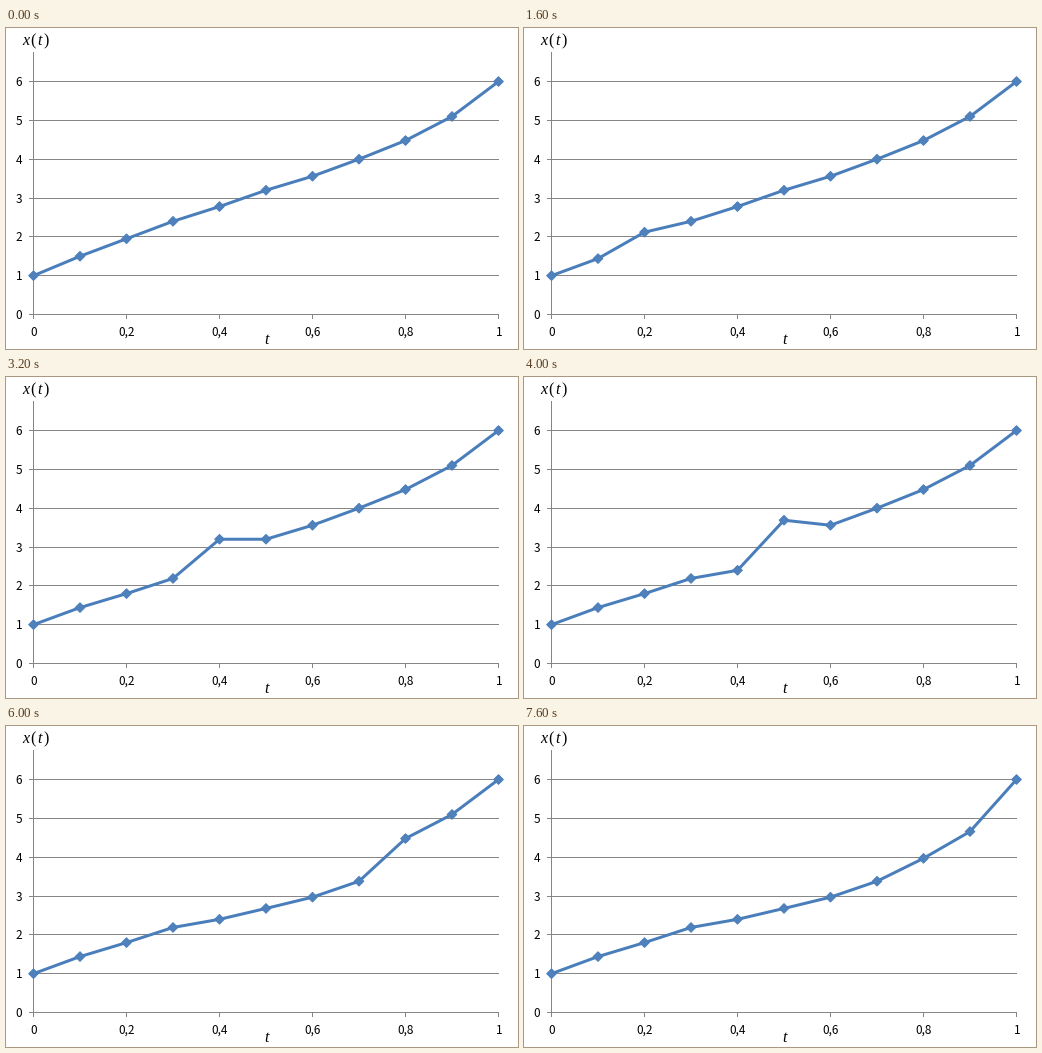
Recreate the animation shown at these times as a matplotlib script. Size 512 by 321 pixels, loop 8 s.

```python
import matplotlib.pyplot as plt
from matplotlib.animation import FuncAnimation
from matplotlib.collections import PolyCollection

W, H, DPI = 512, 321, 64
PX = 72 / DPI  # points per pixel
GREY, BLUE, FILL = "#868686", "#4a7ebb", "#4f81bd"
X0, Y0, DX, DY = 27.5, 286.5, 46.5, 38.83
HALF = 4.8  # half diagonal of a marker

START = [1, 1.5, 1.95, 2.4, 2.78, 3.2, 3.56, 4, 4.48, 5.1, 6]
RAISED = [1, 1.67, 2.12, 2.58, 3.2, 3.69, 4.17, 4.6, 5, 5.54, 6]
FINAL = [1, 1.44, 1.8, 2.19, 2.4, 2.68, 2.97, 3.38, 3.97, 4.66, 6]

fig = plt.figure(figsize=(W / DPI, H / DPI), dpi=DPI, facecolor="white")
ax = fig.add_axes([0, 0, 1, 1])
ax.set_xlim(0, W)
ax.set_ylim(H, 0)
ax.axis("off")


def px_y(value):
    return Y0 - DY * value


def rule(x1, y1, x2, y2):
    # Pixel centres are given exactly, so automatic snapping stays off.
    ax.plot([x1, x2], [y1, y2], color=GREY, lw=PX, snap=False,
            solid_capstyle="butt", zorder=1)


def label(x, y, text, ha):
    ax.text(x, y, text, ha=ha, va="baseline", family="Noto Sans CJK JP",
            fontsize=11.8 * PX, color="black")


def math_text(x, y, text, style="italic"):
    ax.text(x, y, text, ha="left", va="baseline", family="Liberation Serif",
            style=style, fontsize=16 * PX, color="black")


# Grid, axes and tick labels
for v in range(7):
    y = int(px_y(v)) + 0.5
    rule(23, y, 493, y)
    label(16.3, y + 4.7, str(v), "right")
rule(X0, 24, X0, 291)
for i, text in enumerate(["0", "0,2", "0,4", "0,6", "0,8", "1"]):
    x = X0 + 2 * DX * i
    rule(x, 286, x, 291)
    label(x + 0.3, 308, text, "center")

math_text(16.5, 17, "x")
math_text(24.5, 17, "(", "normal")
math_text(31.5, 17, "t")
math_text(37.5, 17, ")", "normal")
math_text(258.5, 316, "t")

curve, = ax.plot([], [], color=BLUE, lw=3 * PX, snap=False,
                 solid_joinstyle="round", zorder=3)
markers = PolyCollection([], facecolor=FILL, edgecolor=BLUE, lw=PX,
                         snap=False, zorder=4)
ax.add_collection(markers, autolim=False)


def diamond(x, y):
    return [(x - HALF, y), (x, y - HALF), (x + HALF, y), (x, y + HALF)]


def values(step):
    """Each inner node is raised for one step, then settles for good."""
    node, settled = divmod(step, 2)
    result = FINAL[:node] + START[node:]
    if node:
        result[node] = FINAL[node] if settled else RAISED[node]
    return result


def draw(step):
    xs = [X0 + DX * k for k in range(11)]
    ys = [px_y(v) for v in values(step)]
    curve.set_data(xs, ys)
    markers.set_verts([diamond(x, y) for x, y in zip(xs, ys)])
    return curve, markers


anim = FuncAnimation(fig, draw, frames=20, interval=400, repeat=True,
                     repeat_delay=0, blit=False)
plt.show()
```
